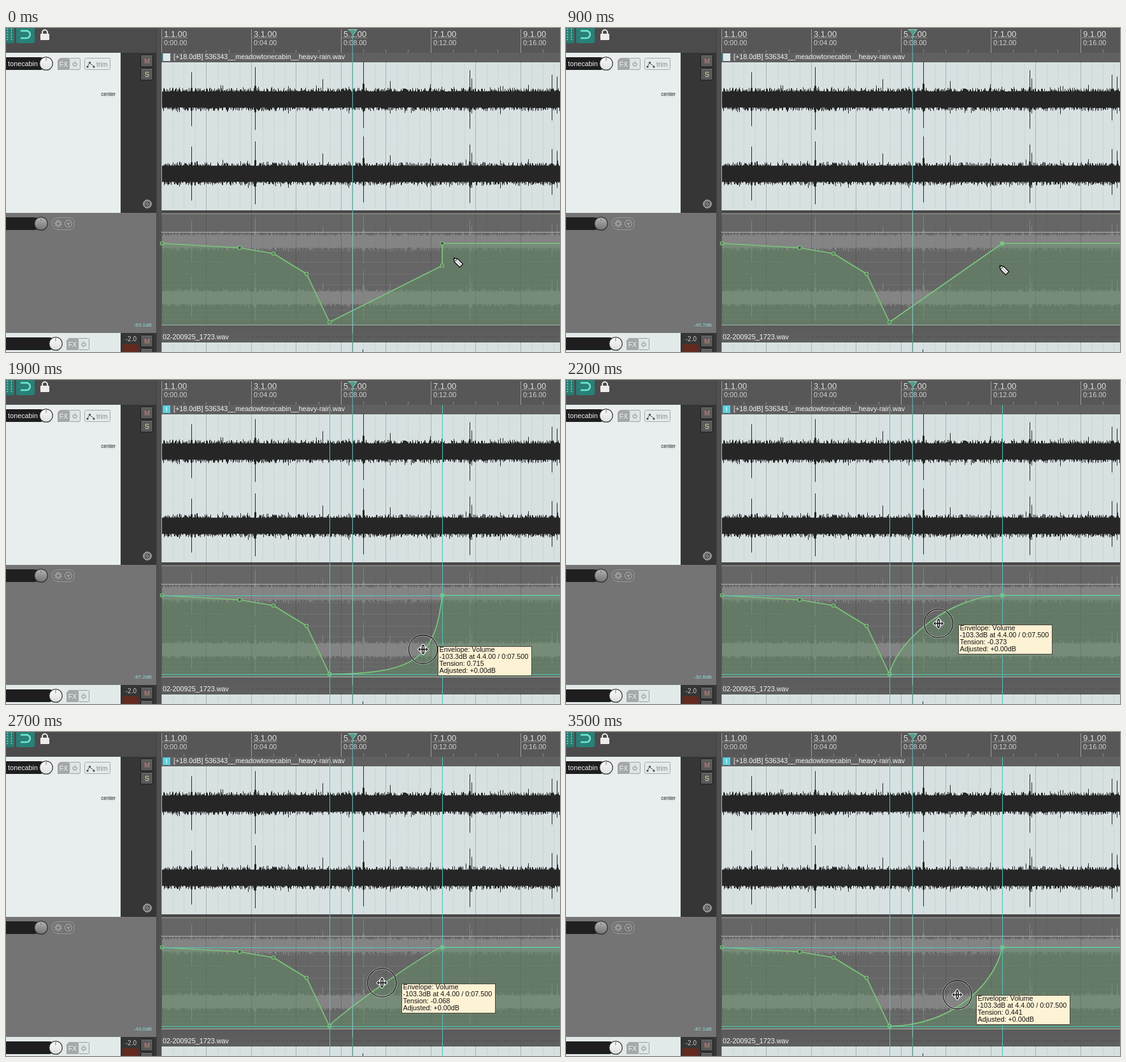
Animation, 870 px wide and 510 px high, one loop 3600 ms. Source, as an HTML page with a canvas:

```html
<!DOCTYPE html>
<html lang="en">
<head>
<meta charset="utf-8">
<title>Envelope curvature</title>
<style>
html, body { margin: 0; width: 870px; height: 510px; overflow: hidden; background: #555; }
canvas { display: block; }
</style>
</head>
<body>
<canvas id="stage" width="870" height="510"></canvas>
<script>
const W = 870, H = 510, LEFT = 244, LOOP = 3600, STEP = 100;
const FONT = '"Liberation Sans", Arial, sans-serif';
const BAR = 70.45;
const TEAL = '#55c6bd', GREEN = '#7cc67c';
const screen = document.getElementById('stage').getContext('2d');
const back = document.createElement('canvas');
back.width = W;
back.height = H;
let c = back.getContext('2d');

// ---- drawing helpers ----
function box(x, y, w, h, color) {
  c.fillStyle = color;
  c.fillRect(x, y, w, h);
}
function round(x, y, w, h, r, fill, stroke) {
  c.beginPath();
  c.roundRect(x, y, w, h, r);
  paint(fill, stroke);
}
function disc(x, y, r, fill, stroke, width) {
  c.beginPath();
  c.arc(x, y, r, 0, 7);
  paint(fill, stroke, width);
}
function paint(fill, stroke, width = 1) {
  if (fill) { c.fillStyle = fill; c.fill(); }
  if (stroke) { c.strokeStyle = stroke; c.lineWidth = width; c.stroke(); }
}
function path(points, stroke, width = 1, fill) {
  c.beginPath();
  points.forEach(([x, y]) => c.lineTo(x, y));
  paint(fill, stroke, width);
}
function text(str, x, y, size, color, align = 'left') {
  c.font = size + 'px ' + FONT;
  c.textAlign = align;
  c.fillStyle = color;
  c.fillText(str, x, y);
}
function random(seed) {
  return () => (seed = seed * 16807 % 2147483647) / 2147483647;
}

// ---- waveform: [x, rise, fall] ----
const SPIKES = [[291, 43, 42], [391, 51, 48], [561, 59, 45], [728, 46, 46], [857, 39, 33],
  [603, 29, 22], [497, 32, 18], [340, 22, 17], [731, 33, 22], [865, 36, 22], [272, 19, 20],
  [443, 21, 22], [538, 20, 22], [666, 24, 20], [776, 21, 23], [820, 23, 19]];

function wave(center, seed, color) {
  const rnd = random(seed);
  const reach = () => 12.5 + rnd() ** 2 * 6 + (rnd() > .96 ? 4 : 0);
  c.fillStyle = color;
  for (let x = LEFT + 1; x < W; x++) {
    let up = reach(), down = reach();
    for (const [sx, rise, fall] of SPIKES) {
      const near = Math.abs(sx - x);
      if (near < 2) {
        const k = near ? .42 : 1;
        up = Math.max(up, rise * k);
        down = Math.max(down, fall * k);
      }
    }
    c.fillRect(x, center - up, 1, up + down);
  }
}
function waves(color) {
  wave(112.5, 77, color);
  wave(229.5, 4021, color);
}

function grid(top, bottom, strong, weak) {
  c.lineWidth = 1;
  for (let i = 0; i < 36; i++) {
    const x = Math.round(LEFT + i * BAR / 4) + .5;
    const isBar = i % 4 === 0;
    c.setLineDash(isBar ? [1, 1] : [1, 2]);
    path([[x, top], [x, bottom]], isBar ? strong : weak);
  }
  c.setLineDash([]);
}

// ---- static parts ----
function knob(x, y, light, shade) {
  const face = c.createLinearGradient(0, y - 10, 0, y + 10);
  face.addColorStop(0, light);
  face.addColorStop(1, shade);
  disc(x, y, 10.3, face, '#2a2a2a', 1.1);
  path([[x, y - 9], [x, y - 4]], '#777', 1);
}
function power(x, y) {
  c.beginPath();
  c.arc(x, y, 3, -.9, 4.05);
  paint(null, '#777');
  path([[x, y - 4.5], [x, y - .5]], '#777');
}
function fxButton(x, y) {
  path([[x + 4, y], [x + 18, y], [x + 18, y + 19], [x, y + 19], [x, y + 4]], null, 1, '#a4a8a8');
  round(x + 18.5, y + .5, 17, 18, 2, '#dfe5e5', '#9a9f9f');
  text('FX', x + 9.5, y + 14, 10, '#f4f4f4', 'center');
  power(x + 27, y + 10);
}
function key(label, y, color) {
  round(211.5, y + .5, 19, 18.5, 2, '#5a5a5a', '#161616');
  path([[212.5, y + 1.5], [229.5, y + 1.5]], '#777');
  text(label, 221.5, y + 14, 11, color, 'center');
}

function toolbar() {
  box(0, 0, 236, 39, '#4b4b4b');
  round(-4, -4, 17, 28, 3, '#2a7a70');
  round(16, -4, 29, 28, 3, '#2a8076');
  c.setLineDash([2, 2]);
  path([[2.5, 1], [2.5, 21]], '#7fe0d0', 1.5);
  path([[8.5, 1], [8.5, 21]], '#7fe0d0', 1.5);
  c.setLineDash([]);
  c.beginPath();
  c.moveTo(23, 4.5);
  c.lineTo(32, 4.5);
  c.arc(32, 10.2, 5.8, -Math.PI / 2, Math.PI / 2);
  c.lineTo(23, 16);
  paint(null, '#74e6d2', 2.6);
  round(54, 9, 14, 10, 1, '#ececec');
  c.beginPath();
  c.arc(61, 7, 4, Math.PI, 0);
  c.lineTo(65, 10);
  c.moveTo(57, 7);
  c.lineTo(57, 10);
  paint(null, '#ececec', 2);
}

function trackPanels() {
  box(0, 39, 180, 252, '#e8eeee');
  box(180, 39, 56, 252, '#363636');
  round(-20, 46, 84, 20, 10, '#1e1e1e');
  text('tonecabin', 50, 60, 10.8, '#f0f0f0', 'right');
  knob(63, 56, '#fafafa', '#dcdede');
  fxButton(81, 47);
  round(123.5, 47.5, 40, 18, 2, '#e4eaea', '#a4a9a9');
  path([[128, 61], [131, 55], [135, 58], [139, 61]], '#555');
  [[128, 61], [131.5, 54.5], [138, 61]].forEach(p => disc(p[0], p[1], 1.6, '#444'));
  text('trim', 142, 61, 10.5, '#858989');
  text('center', 172, 107, 8.2, '#222', 'right');
  key('M', 42, '#d9837c');
  key('S', 63, '#e3dfa0');
  disc(222, 277, 6.5, '#8c8c8c', '#a4a4a4');
  disc(222, 277, 3.5, null, '#333');
  path([[218.5, 280.5], [225.5, 273.5]], '#333');

  box(0, 291, 236, 189, '#747474');
  round(-20, 298, 75, 20, 10, '#202020');
  knob(55, 308, '#b4b4b4', '#727272');
  round(72.5, 298.5, 35, 19, 8, null, '#999');
  disc(82, 308, 3.4, null, '#a3a3a3', 2);
  c.setLineDash([2, 2.2]);
  disc(82, 308, 5.5, null, '#a3a3a3', 1.6);
  c.setLineDash([]);
  disc(98, 308, 5.5, null, '#a3a3a3', 1.3);
  path([[95, 306.5], [101, 306.5], [98, 311]], null, 1, '#a3a3a3');

  box(0, 480, 180, 30, '#e2e9e9');
  box(180, 480, 56, 30, '#363636');
  round(-20, 487, 98, 20, 10, '#1e1e1e');
  knob(78, 497, '#fafafa', '#dcdede');
  fxButton(95, 488);
  text('-2.0', 205, 493, 10, '#c8c8c8', 'right');
  box(183, 498, 25, 12, '#64291f');
  key('M', 483, '#d9837c');
  key('', 504, '#fff');
  box(236, 0, 8, H, '#505050');
  box(236, 0, 1, H, '#444');
}

function ruler() {
  box(LEFT, 0, W - LEFT, 39, '#575757');
  for (let i = 0; i < 18; i++) {
    const x = Math.round(LEFT + i * BAR / 2) + .5;
    path([[x, i % 4 ? 34 : 2], [x, 39]], i % 4 ? '#888' : '#a0a0a0');
  }
  for (let i = 0; i < 5; i++) {
    const x = Math.round(LEFT + i * BAR * 2) + 4;
    text(i * 2 + 1 + '.1.00', x, 14, 13, '#dedede');
    text('0:' + String(i * 4).padStart(2, '0') + '.00', x, 27, 10.9, '#d2d2d2');
    path([[x - 4, 15.5], [x + 37, 15.5]], '#8c8c8c');
  }
}

function arrange() {
  box(LEFT, 39, W - LEFT, 15, '#606060');
  text('[+18.0dB] 536343__meadowtonecabin__heavy-rain.wav', 263, 49, 10.77, '#f4f4f4');
  box(LEFT, 54, W - LEFT, 234, '#d8e1e2');
  grid(54, 288, '#7d8686', '#b2bcbc');
  waves('#262626');
  box(LEFT, 287, W - LEFT, 4, '#474747');

  box(LEFT, 291, W - LEFT, 189, '#666');
  box(LEFT, 292, W - LEFT, 1, '#8e8e8e');
  c.save();
  c.translate(0, 292 - 54 * .755);
  c.scale(1, .755);
  waves('#848484');
  c.restore();
  grid(293, 467, 'rgba(40,40,40,.5)', 'rgba(40,40,40,.14)');
  [350, 368, 387, 404, 444, 451, 458].forEach(y => box(LEFT, y, W - LEFT, 1, 'rgba(180,180,180,.13)'));
  box(LEFT, 321, W - LEFT, 1, '#b4b4b4');
  box(LEFT, 467, W - LEFT, 1, '#a8b2a8');
  box(LEFT, 468, W - LEFT, 12, '#5c5c5c');

  box(LEFT, 480, W - LEFT, 15, '#5e5e5e');
  const rnd = random(9);
  for (let x = 380; x < W; x += 6) box(x, 486, 2 + rnd() * 4, 1, '#4c4c4c');
  text('02-200925_1723.wav', 246, 490, 10.8, '#f4f4f4');
  box(LEFT, 495, W - LEFT, 15, '#d8e1e2');
  grid(495, H, '#7d8686', '#b2bcbc');
  box(560, 506, 1, 4, '#262626');
}

toolbar();
trackPanels();
ruler();
arrange();
c = screen;

// ---- motion ----
// time, then values; eased between rows
const CURSOR = [[0, 704, 362], [500, 683, 375], [900, 682, 374], [1300, 619, 385], [1500, 612, 397],
  [1900, 655, 424], [2400, 547, 361], [2900, 614, 413], [3500, 614.5, 413.5]];
const TIP = [[1500, 636, 393], [1900, 678, 419], [2400, 583, 367], [2900, 642, 412], [3500, 644, 413.5]];
const TENSION = [[1500, 0], [1900, .715], [2400, -.964], [2900, .419], [3500, .441]];
// tension, level at the playhead
const LEVEL = [[-1, -6], [-.964, -7.17], [0, -45.7], [.419, -86], [.441, -87.1], [.715, -97.2], [1, -103.3]];
const DELETE_AT = 600, HOVER_AT = 1100, HINT_AT = 1300, DRAG_AT = 1500;

function sample(rows, t, ease = k => k * k * (3 - 2 * k)) {
  if (t <= rows[0][0]) return rows[0].slice(1);
  const i = rows.findIndex(row => row[0] > t);
  if (i < 0) return rows[rows.length - 1].slice(1);
  const a = rows[i - 1], b = rows[i];
  const k = ease((t - a[0]) / (b[0] - a[0]));
  return a.slice(1).map((v, j) => v + (b[j + 1] - v) * k);
}

const HEAD = [[245, 339], [367, 346], [420, 355], [472, 387], [508, 463]];
const [X0, Y0, X1, Y1] = [508, 463, 685, 339];

function trace(tension, deleted) {
  const bend = Math.abs(tension), soft = .3 * bend * (1 - bend);
  const pull = bend + soft;
  // a negative tension is the same curve turned by half a turn
  const [ax, ay, bx, by] = tension > 0 ? [pull, 0, 1 - soft, 1 - pull] : [soft, pull, 1 - pull, 1];
  const px = u => X0 + (X1 - X0) * u, py = u => Y0 + (Y1 - Y0) * u;
  c.beginPath();
  HEAD.forEach(p => c.lineTo(...p));
  if (deleted) {
    c.bezierCurveTo(px(ax), py(ay), px(bx), py(by), X1, Y1);
  } else {
    c.lineTo(X1, 374);
    c.lineTo(X1, Y1);
  }
  c.lineTo(W + 2, Y1);
}

function envelope(tension, deleted, drag) {
  trace(tension, deleted);
  c.lineTo(W + 2, 467);
  c.lineTo(245, 467);
  paint('rgba(98,152,106,.41)');
  trace(tension, deleted);
  c.lineJoin = 'round';
  paint(null, GREEN, 1.7);
  HEAD.forEach(([x, y], i) => disc(x, y, 2.7, i === 1 ? '#3f5c42' : '#5f7962', GREEN, 1.1));
  if (!deleted) disc(X1, 374, 2.7, '#5f7962', GREEN, 1.1);
  disc(X1, Y1, deleted ? 3 : 2.7, deleted ? GREEN : '#3f5c42', GREEN, 1.1);
  if (drag) {
    [Y0, Y1].forEach(y => box(LEFT, y, W - LEFT, 1, TEAL));
    [X0, X1].forEach(x => {
      box(x, 39, 1, H - 39, TEAL);
      disc(x + .5, x === X0 ? Y0 : Y1, 2.7, null, GREEN, 1.1);
    });
  }
}

function playhead() {
  box(543.7, 10, 1.3, 281, '#5fa8a0');
  box(543.7, 291, 1.3, 189, '#84bdb6');
  box(543.7, 480, 1.3, 30, '#5f9a8c');
  path([[537, 2.5], [551, 2.5], [544.5, 11.5]], '#a5d8c8', 1, '#4e9c87');
}

function pencil(x, y) {
  c.save();
  c.translate(x, y);
  c.rotate(Math.PI / 4);
  path([[0, 0], [5, -3.5], [17, -3.5], [17, 3.5], [5, 3.5], [0, 0]], '#111', 1.3, '#f4f4f4');
  path([[5, -3.5], [5, 3.5]], '#111');
  path([[6, 0], [16, 0]], '#999');
  path([[0, 0], [2.5, -1.7], [2.5, 1.7]], null, 1, '#111');
  c.restore();
}

function moveCursor(x, y) {
  c.save();
  c.translate(x, y);
  const shape = new Path2D();
  for (let i = 0; i < 4; i++) {
    const q = a => [a[0] * Math.cos(i * Math.PI / 2) - a[1] * Math.sin(i * Math.PI / 2),
                    a[0] * Math.sin(i * Math.PI / 2) + a[1] * Math.cos(i * Math.PI / 2)];
    shape.moveTo(...q([8, 0]));
    shape.lineTo(...q([4.5, -3]));
    shape.lineTo(...q([4.5, 3]));
    shape.closePath();
  }
  shape.rect(-5, -.8, 10, 1.6);
  shape.rect(-2.2, -5, 1.5, 10);
  shape.rect(.7, -5, 1.5, 10);
  c.strokeStyle = '#fff';
  c.lineWidth = 2;
  c.stroke(shape);
  c.fillStyle = '#111';
  c.fill(shape);
  c.restore();
}

function tooltip(x, y, w, h, lines, color) {
  x = Math.round(x);
  y = Math.round(y);
  box(x, y, w, h, '#4a463c');
  box(x + 1, y + 1, w - 2, h - 2, color);
  lines.forEach((line, i) => text(line, x + 2.5, y + 9 + i * 11, 10.8, '#111'));
}

function badge(active) {
  box(246, 40, 12, 12, active ? '#5acfdf' : '#dbe9ea');
  box(246, 40, 1, 12, '#45c8da');
  if (active) {
    box(251.5, 42.5, 1.5, 7, '#c8f2f6');
    box(250, 43.5, 2, 1, '#c8f2f6');
  }
}

function render(t) {
  const deleted = t >= DELETE_AT, drag = t >= DRAG_AT;
  const [tension] = sample(TENSION, t);
  const [x, y] = sample(CURSOR, t);
  const [level] = deleted ? sample(LEVEL, tension, k => k) : [-53.1];
  c.drawImage(back, 0, 0);
  badge(t >= HOVER_AT);
  envelope(tension, deleted, drag);
  playhead();
  text(level.toFixed(level > -10 ? 2 : 1) + 'dB', 229, 469.5, 8.1, '#8fdde0', 'right');
  if (t < HOVER_AT) return pencil(x - 1, y);
  if (drag) {
    disc(x, y, 22.5, null, 'rgba(225,225,225,.55)', 3);
    disc(x, y, 22.5, null, '#141414', 1.3);
    const [tx, ty] = sample(TIP, t);
    tooltip(tx, ty, 148, 47, ['Envelope: Volume', '-103.3dB at 4.4.00 / 0:07.500',
      'Tension: ' + tension.toFixed(3), 'Adjusted: +0.00dB'], '#fdf2d4');
  } else if (t >= HINT_AT) {
    tooltip(x + 31, y + 1, 262, 13, ['Edit envelope segment curvature [0.000 at 6.2.00]'], '#fbf8e8');
  }
  moveCursor(x, y);
}

const start = performance.now();
function tick() {
  const t = (performance.now() - start) % LOOP;
  render(Math.floor(t / STEP) * STEP);
  requestAnimationFrame(tick);
}
tick();
</script>
</body>
</html>
```
